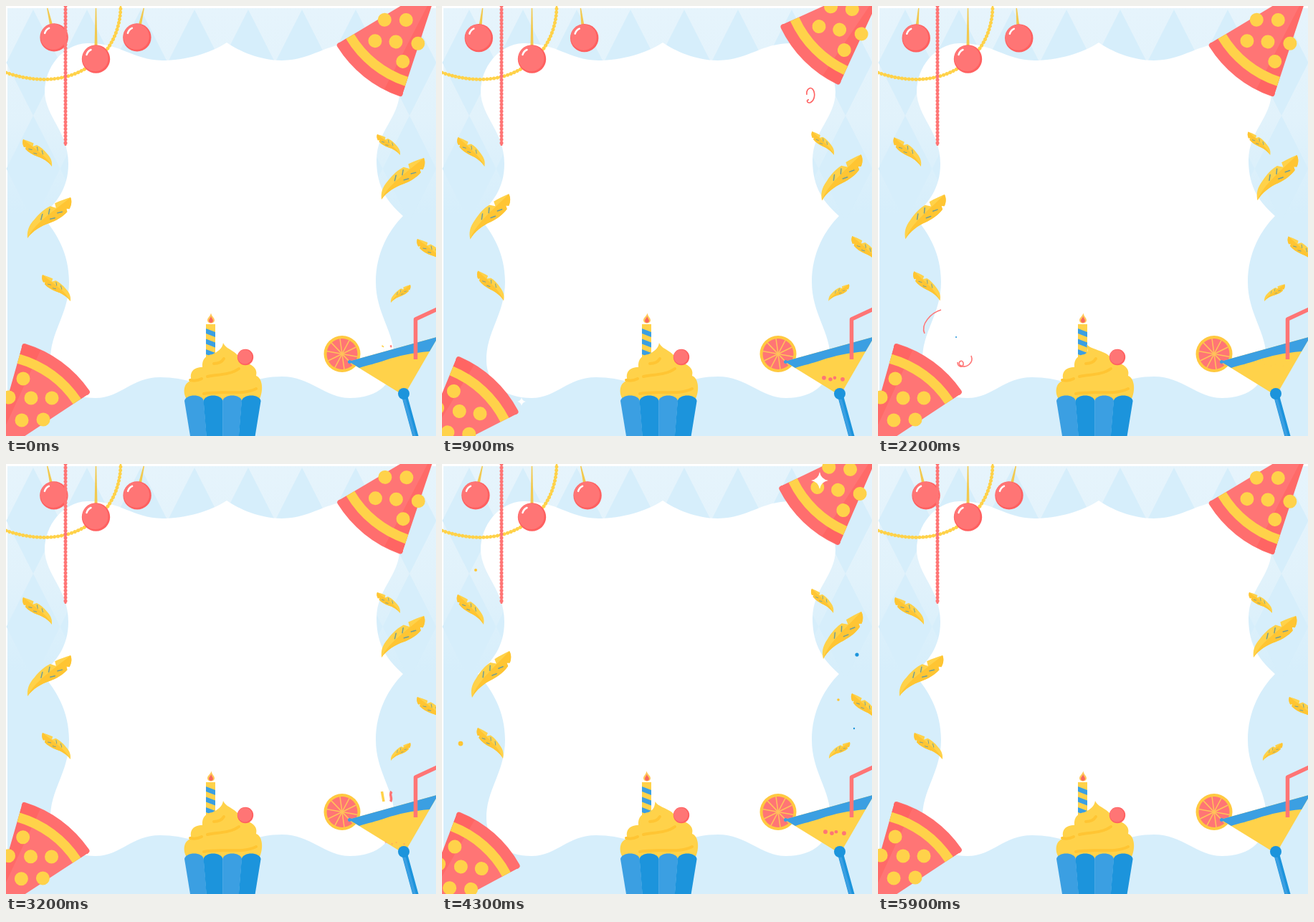
Write an HTML page with a canvas that moves like this. It is 600 px wide and 600 px high and loops after 5.95 s.

```html
<!DOCTYPE html>
<html lang="en">
<head>
<meta charset="utf-8">
<title>Party frame</title>
<style>
html, body { margin: 0; width: 100%; height: 100%; overflow: hidden; background: #fff; }
canvas { display: block; }
</style>
</head>
<body>
<canvas id="stage" width="600" height="600"></canvas>
<script>
const ctx = document.getElementById('stage').getContext('2d');
const LOOP = 5950, RAD = Math.PI / 180;
const CORAL = '#ff7575', RED = '#ff6060', YELLOW = '#ffd24a', GOLD = '#ffc533',
      BLUE = '#3b9fe2', DEEP = '#1c94dc', SKY = '#d6eefb';

const ease = u => u < .5 ? 4 * u ** 3 : 1 - (2 - 2 * u) ** 3 / 2;
const ramp = (a, b, t) => ease(Math.min(1, Math.max(0, (t - a) / (b - a))));
const bump = (t, a, b, c, d) => ramp(a, b, t) - ramp(c, d, t);
const mix = (a, b, k) => a + (b - a) * k;

function fill(d, color) {
  ctx.fillStyle = color;
  ctx.fill(new Path2D(d));
}
function line(d, color, width = 2) {
  ctx.strokeStyle = color;
  ctx.lineWidth = width;
  ctx.stroke(new Path2D(d));
}
function disc(x, y, r, color) {
  ctx.fillStyle = color;
  ctx.beginPath();
  ctx.arc(x, y, Math.max(0, r), 0, 7);
  ctx.fill();
}
function group(draw) {
  ctx.save();
  draw();
  ctx.restore();
}

const FRAME = `M308 51C285 66 250 76 218 76C175 75 160 51 113 52C80 53 54 85 54 120
  C55 155 87 175 87 220C87 255 70 275 50 293C70 315 88 345 88 385C88 430 61 455 62 495
  C62 525 85 547 125 547C160 547 175 518 215 518C250 518 280 530 302 543
  C325 530 350 517 385 517C425 517 445 547 480 547C520 547 542 525 542 495
  C543 455 516 430 516 385C516 345 534 313 554 293C534 275 517 255 517 215
  C517 175 549 155 549 120C549 85 522 53 490 52C445 51 430 75 385 76C355 76 325 63 308 51Z`;

function background() {
  ctx.fillStyle = '#fff';
  ctx.fillRect(0, 0, 600, 600);
  const g = ctx.createLinearGradient(0, 0, 0, 290);
  g.addColorStop(0, '#e6f4fc');
  g.addColorStop(.55, '#e1f2fb');
  g.addColorStop(1, SKY);
  ctx.fillStyle = g;
  ctx.fillRect(2, 3, 598, 597);
  for (let x = 38; x < 640; x += 75)
    for (const y of [5, 153])
      fill(`M${x} ${y}l37.5 74l-37.5 74l-37.5 -74Z`, SKY);
  fill(FRAME, '#fff');
}

function chain(d, color) {
  group(() => {
    ctx.lineCap = 'round';
    ctx.setLineDash([.1, 4.8]);
    line(d, color, 5);
  });
  line(d, color, 2.5);
}

function ball(x, length, angle) {
  group(() => {
    ctx.translate(x, 0);
    ctx.rotate(-angle * RAD);
    fill(`M-.7 3L.7 3L2 ${length - 18}L-2 ${length - 18}Z`, '#f2c94f');
    ctx.translate(0, length);
    ctx.rotate(angle * RAD);
    disc(0, 0, 19.7, RED);
    disc(-1, -1, 18, CORAL);
    ctx.lineCap = 'round';
    line('M-13 -6Q-11.5 -11 -7 -13', '#fff', 2.5);
  });
}

const VANE = `M0 0C7 -9 15 -14 30 -15C44 -17 56 -16 65 -13L70 -4L74 -11C83 -8 92 -4 100 0
  C98 6 92 11 85 13L82 9L79 14C68 15 56 12 44 7C32 1 14 -3 0 0Z`;
const VANE_SHADE = `M0 0C25 -10 60 -3 100 0C98 6 92 11 85 13L82 9L79 14
  C68 15 56 12 44 7C32 1 14 -3 0 0Z`;

// Base and tip travel from the first four values to the last four.
const feathers = [
  [64, 224, 24, 186, 58, 224, 22, 182, -1],
  [30, 324, 90, 267, 42, 326, 94, 261, 1],
  [90, 412, 51, 375, 85, 411, 50, 368, -1],
  [550, 208, 518, 179, 546, 208, 516, 174, -1],
  [524, 270, 583, 212, 532, 272, 585, 206, 1],
  [614, 361, 574, 325, 608, 360, 572, 320, -1],
  [537, 414, 564, 389, 540, 411, 569, 388, 1]
];
function feather(f, k) {
  const [x, y, tx, ty] = [0, 1, 2, 3].map(i => mix(f[i], f[i + 4], k));
  const size = Math.hypot(tx - x, ty - y) / 100;
  group(() => {
    ctx.translate(x, y);
    ctx.rotate(Math.atan2(ty - y, tx - x));
    ctx.scale(size, size * f[8]);
    fill(VANE, YELLOW);
    fill(VANE_SHADE, GOLD);
    ctx.lineCap = 'round';
    line('M38 -7L46 -12M54 -5L61 -10M50 3L57 7M66 4L73 8', '#6f9d96', 1.8);
  });
}

const HAT = 168, HAT_FROM = -74.2, HAT_TO = -33.5;
const hatDots = [[46, -112], [26, -86], [57, -85], [86, -85], [44, -54], [74, -55]];

// The tip of the cone sits at x, y.
function hat(x, y, turn) {
  const sector = (r0, r1, a, b, color) => {
    ctx.fillStyle = color;
    ctx.beginPath();
    ctx.arc(0, 0, r1, a * RAD, b * RAD);
    ctx.arc(0, 0, r0, b * RAD, a * RAD, true);
    ctx.fill();
  };
  group(() => {
    ctx.translate(x, y);
    ctx.rotate(turn * RAD);
    sector(0, HAT - 4, HAT_FROM, HAT_TO, CORAL);
    ctx.lineCap = 'round';
    ctx.lineWidth = 8;
    ctx.strokeStyle = '#ff6e6e';
    ctx.beginPath();
    ctx.arc(0, 0, HAT - 4, (HAT_FROM + 1.2) * RAD, (HAT_TO - 1.2) * RAD);
    ctx.stroke();
    sector(HAT * .9, HAT - 4, HAT_FROM, HAT_TO, '#ff6e6e');
    sector(0, HAT - 1, HAT_FROM, HAT_FROM + 9, 'rgba(255,70,60,.22)');
    sector(HAT * .825, HAT * .905, HAT_FROM, HAT_TO, YELLOW);
    hatDots.forEach(([dx, dy]) => disc(dx, dy, 9.5, YELLOW));
  });
}
function hats(k) {
  group(() => {
    ctx.translate(551 + 2 * k, 127 - 16.5 * k);
    ctx.rotate(6.5 * k * RAD);
    ctx.translate(-551, -127);
    hat(604.6, -32.5, 182.5);
  });
  group(() => {
    ctx.translate(26 - 2 * k, 470 + 18 * k);
    ctx.rotate(6.5 * k * RAD);
    ctx.translate(-26, -470);
    hat(-22, 632, 0);
  });
}

function cupcake(sway, t) {
  group(() => {
    ctx.beginPath();
    ctx.rect(279, 444, 13, 46);
    ctx.clip();
    ctx.fillStyle = YELLOW;
    ctx.fillRect(279, 444, 13, 46);
    for (let y = 450; y < 490; y += 14.5)
      fill(`M279 ${y}L292 ${y + 5}v7L279 ${y + 7}Z`, BLUE);
  });
  const lean = Math.sin(t * 9) * .8;
  fill(`M${286 + lean} 428.5C287 433 291 435 291 438.5C291 444 281 444 281 438.5C281 435 285 433 ${286 + lean} 428.5Z`, '#ffc95a');
  fill(`M${286 + lean / 2} 433C287 436 289 437 289 439C289 443 283 443 283 439C283 437 285 436 ${286 + lean / 2} 433Z`, '#f9685e');

  const tip = 303 - 11.5 * sway;
  fill(`M253 550C246 541 247 525 259 523C255 511 262 504 274 504C273 492 280 487 288 486
    C296 482 ${tip - 1} 478 ${tip} ${470 + 2 * sway}C${tip + 4} 480 324 481 327 495
    C341 499 352 504 349 516C358 519 360 537 353 550Z`, YELLOW);
  ctx.lineCap = 'round';
  line('M257 522Q266 524 273 520M281 517C295 514 313 515 325 506M276 541C300 536 330 544 349 534M290 499Q300 499 304 492', GOLD, 4);
  disc(334, 490, 11.2, RED);
  disc(333.3, 489.5, 10, CORAL);

  for (let i = 0; i < 4; i++) {
    const x = 249 + i * 26.6, foot = 257 + i * 22.6;
    fill(`M${x} 551C${x + 2} 541 ${x + 25} 541 ${x + 26.8} 551L${foot + 22.8} 600H${foot}Z`, i % 2 ? DEEP : BLUE);
  }
}

function drink(t) {
  disc(469, 485.5, 25.5, '#ffc940');
  disc(469, 485.5, 21.5, CORAL);
  for (let a = 10; a < 180; a += 36) {
    const c = 21 * Math.cos(a * RAD), s = 21 * Math.sin(a * RAD);
    line(`M${469 - c} ${485.5 - s}L${469 + c} ${485.5 + s}`, '#ffc35a', 1.5);
  }
  ctx.lineCap = 'butt';
  line('M556 544L573 606', DEEP, 8);
  line('M554.5 544L571.5 606', BLUE, 4);
  fill('M478 496L603 461.5L557 541H551Z', YELLOW);
  fill('M478 496L603 461.5L591 482C567 484 548 488 530 494C516 499 505 501 493 505Z', BLUE);
  disc(479.5, 496.5, 2.5, BLUE);
  ctx.lineJoin = 'round';
  line('M571.5 493V437L604 422', CORAL, 5.5);
  disc(555, 541, 8, DEEP);

  const size = 3 * Math.sin(Math.PI * Math.min(1, (t + .1) / 2.4));
  if (size > 0) group(() => {
    ctx.globalAlpha = Math.min(1, size / 2.6);
    [[533, 1], [542, .95], [548, .8], [559, 1]].forEach(([x, s], i) =>
      disc(x + 5 * (t - .87), 531 - 14 * t + (i % 2 ? 2 : 0), size * s, CORAL));
  });

  const p = (t + .02) / .44;
  if (p < 1) {
    const grow = Math.sin(Math.PI * p), h = 7 * grow, y = 476 - 24 * p, width = 1.5 + 2 * grow;
    ctx.lineCap = 'butt';
    line(`M524.5 ${y - h}L527 ${y + h}`, YELLOW, width);
    line(`M538 ${y - h}C534 ${y - h / 3} 540 ${y + h / 3} 536.5 ${y + h}`, CORAL, width);
  }
}

// Time, position, upward drift, colour, curve
const streamers = [
  [.87, 514, 125, -16, RED, 'M-5 -1C-6 -9 0 -12 3 -9C7 -4 7 6 0 10C-5 11 -6 6 -2 6'],
  [2.2, 76, 440, 18, CORAL, 'M12 -16C-2 -12 -17 4 -11 17'],
  [2.2, 121, 495, 18, CORAL, 'M-10 2C-10 10 -1 10 -2 3C-4 -3 -10 2 -7 6C2 12 13 3 9 -7'],
  [5, 61, 466, 18, CORAL, 'M-1 -19C-7 -9 -1 6 3 19'],
  [5, 94, 479, 18, BLUE, 'M5 6C0 6 -1 1 2 -2C4 -8 -4 -7 -4 -2C-3 3 5 2 4 -3']
];
const specks = [
  [2.2, 109, 462, 1, DEEP], [4.27, 47, 148, 2, GOLD], [4.27, 26, 390, 3.4, GOLD],
  [4.27, 579, 266, 2.6, DEEP], [4.27, 553, 329, 1.8, GOLD], [4.27, 575, 369, 1.2, DEEP],
  [5, 19, 242, 1.2, DEEP], [5, 59, 335, 1.6, GOLD], [5, 580, 168, 1.2, GOLD]
];
const sparkles = [[.87, 111, 552, 6], [4.27, 527, 23, 12]];

function confetti(s) {
  for (const [at, x, y, drift, color, d] of streamers) {
    const p = (s - at) / .28;
    if (Math.abs(p) < 1) group(() => {
      ctx.translate(x, y - drift * p);
      ctx.setLineDash([75 * (1 - p ** 4), 100]);
      line(d, color, 1.6);
    });
  }
  for (const [at, x, y, r, color] of specks) {
    const p = (s - at) / .4;
    if (Math.abs(p) < 1) disc(x, y - 8 * p, r * (1 - p * p), color);
  }
  for (const [at, x, y, r] of sparkles) {
    const p = (s - at) / .25;
    if (Math.abs(p) < 1) group(() => {
      ctx.translate(x, y);
      ctx.scale(r * (1 - p * p), r * (1 - p * p));
      fill('M0 -1Q.15 -.15 1 0Q.15 .15 0 1Q-.15 .15 -1 0Q-.15 -.15 0 -1Z', '#fff');
    });
  }
}

// Fifteen pictures a second, held for 100, 50 and 50 ms in turn.
function steppedTime(ms) {
  const rest = ms % 200;
  return (Math.floor(ms / 200) * 3 + (rest < 100 ? 0 : rest < 150 ? 1 : 2)) / 15;
}

function draw(ms) {
  const s = steppedTime(ms), t = s % 3;
  const swing = bump(t, 0, 1.4, 1.6, 3);
  background();
  chain('M0 93C50 110 92 103 122 80C148 60 160 30 160 0', YELLOW);
  ball(57, 45, mix(13, -13, swing));
  ball(193, 45, mix(-13, 13, swing));
  ball(125.5, 74, 0);
  chain('M83 0V195', CORAL);
  feathers.forEach(f => feather(f, swing));
  hats(bump(t, 0, .9, .9, 1.9));
  cupcake(bump(t, .8, 1.75, 2.1, 2.8), t);
  drink(t);
  confetti(s);
}

const start = performance.now();
function tick() {
  draw((performance.now() - start) % LOOP);
  requestAnimationFrame(tick);
}
tick();
</script>
</body>
</html>
```
